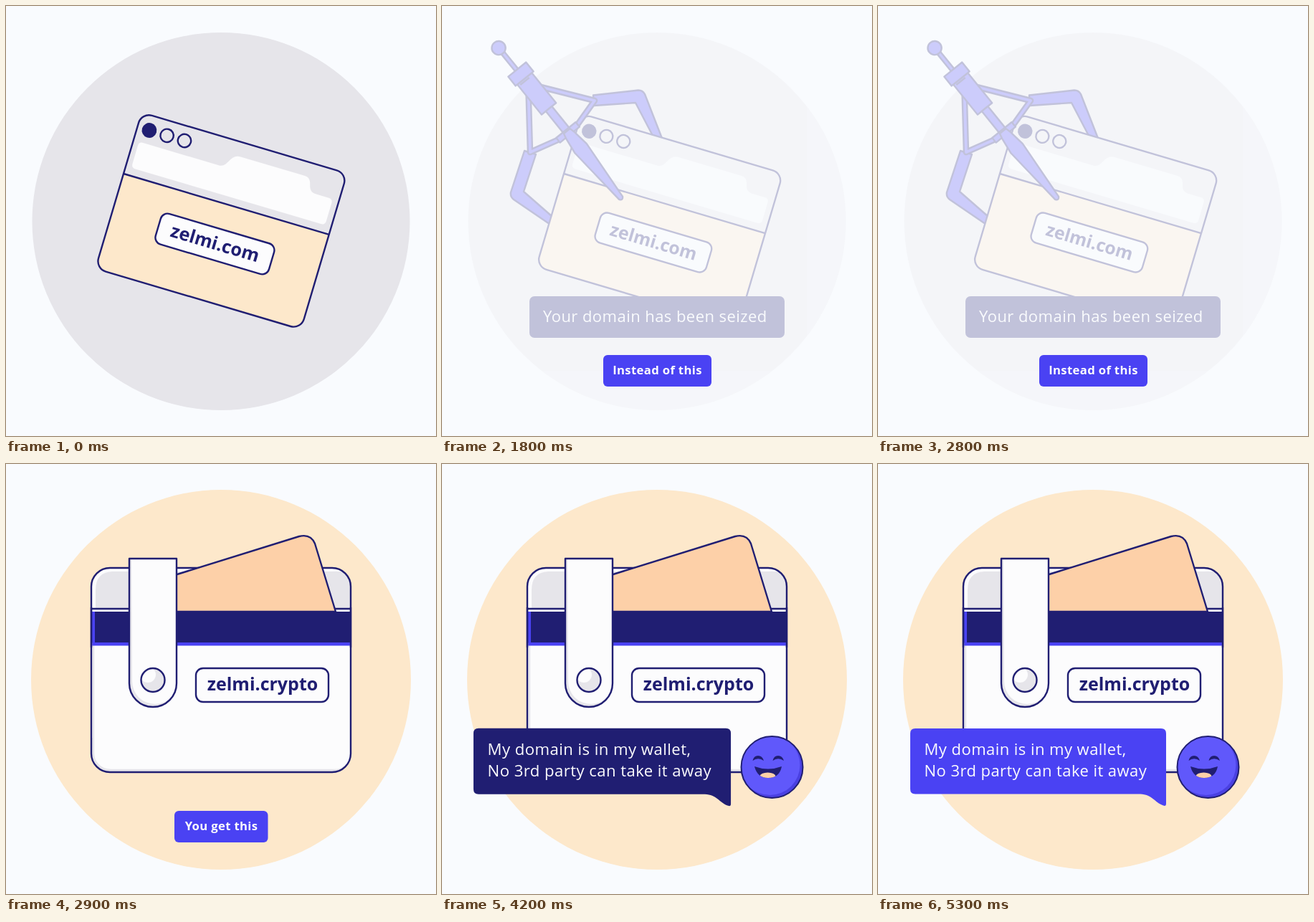
An HTML page that plays this animation: 600x600 px, repeating every 5.4 s.

```html
<!DOCTYPE html>
<html lang="en">
<head>
<meta charset="utf-8">
<title>Domain story</title>
<style>
  html, body { margin: 0; width: 100%; height: 100%; overflow: hidden; background: #f9fbfe; }
  svg {
    --navy: #201e72; --blue: #4a42f3; --page: #fcfcfd; --peach: #fde8cb; --shade: #e6e5ea; --card: #fdd0a8;
    display: block; width: 100vw; height: 100vh;
    font-family: "Open Sans", "Noto Sans", sans-serif;
  }
  text { text-anchor: middle; }
  .page { fill: var(--page); }
  .navy { fill: var(--navy); }
  .blue { fill: var(--blue); }
  .peach { fill: var(--peach); }
  .shade { fill: var(--shade); }
  .card { fill: var(--card); }
  .none { fill: none; }
  .line { stroke: var(--navy); stroke-width: 2.4; stroke-linejoin: round; }
  .bold { font-weight: 700; }
  .note { font-size: 22px; letter-spacing: .44px; }
  .tag { font-size: 16.7px; font-weight: 700; letter-spacing: .33px; }
  .left { text-anchor: start; }
  .rod { fill: none; stroke: var(--navy); stroke-width: 8.6; stroke-linejoin: round; }
  .core { fill: none; stroke: var(--blue); stroke-width: 3.8; stroke-linejoin: round; }
</style>
</head>
<body>
<svg viewBox="0 0 600 600">
  <defs>
    <clipPath id="walletClip"><rect x="119" y="145" width="362" height="285" rx="26"/></clipPath>
    <clipPath id="strapClip"><path d="M172 132H238V306A33 33 0 0 1 172 306Z"/></clipPath>
    <clipPath id="mouthClip"><path d="M436 422Q455 429 474 422Q471 438 455 438Q440 438 436 422Z"/></clipPath>
    <clipPath id="faceClip"><circle cx="460.5" cy="423" r="43"/></clipPath>
    <clipPath id="knobClip"><circle cx="205" cy="301.5" r="16.5"/></clipPath>
  </defs>

  <g id="seized">
    <circle class="shade" cx="300" cy="300.5" r="263.5"/>
    <g id="arms" class="blue line">
      <path d="M211 124.500L274 117.500Q280 117.500 283 123L313 200L304 200L270 135L212 139Z"/>
      <path d="M115 202L96 260Q95 266 100 270L160 311L162 301L114 259L131 207Z"/>
    </g>
    <g id="site">
      <rect class="peach" y="-89" width="299" height="227" rx="15"/>
      <path class="shade" d="M0 0V-74Q0 -89 15 -89H284Q299 -89 299 -74V0Z"/>
      <path class="page" d="M14 -49H124C138 -49 134 -69 150 -69H242C260 -69 248 -49 266 -49H284Q290 -49 290 -43V-17Q290 -11 284 -11H14Q8 -11 8 -17V-43Q8 -49 14 -49Z"/>
      <rect class="none line" y="-89" width="299" height="227" rx="15"/>
      <path class="line" d="M0 0H299"/>
      <circle class="navy line" cx="17.3" cy="-68.2" r="9.2"/>
      <circle class="none line" cx="43" cy="-68.2" r="9.2"/>
      <circle class="none line" cx="68.4" cy="-68.2" r="9.2"/>
      <rect class="page line" x="67.5" y="35.5" width="165" height="44.5" rx="10"/>
      <text class="navy bold" x="150" y="65.5" font-size="25.2">zelmi.com</text>
    </g>
    <g id="claw">
      <path class="rod" d="M130 111L213 132L188 167M120.500 118L123 204L168 184"/>
      <path class="core" d="M130 111L213 132L188 167M120.500 118L123 204L168 184"/>
      <g class="blue line" transform="translate(80 57.8) rotate(51.1)">
        <rect x="8" y="-1.8" width="33" height="5.6"/>
        <circle cy="1.2" r="9.6"/>
        <rect x="56" y="-13" width="54" height="26"/>
        <rect x="39.5" y="-16" width="16.5" height="32"/>
        <path class="none" d="M59 -6V10"/>
        <rect x="110" y="-5.5" width="40" height="11"/>
        <rect x="148" y="-17.500" width="8.500" height="35"/>
        <path d="M150 -5.500L158 -7.500L181 -10.500L270 -3.200Q275 0 270 3.200L181 10.500L158 7.500L150 5.500Z"/>
      </g>
    </g>
    <g id="banner">
      <rect class="navy" x="122" y="405" width="356" height="58" rx="7"/>
      <text class="page note left" x="141" y="440.500">Your domain has been seized</text>
    </g>
  </g>

  <g id="tagA">
    <rect class="blue" x="225" y="487" width="151" height="44" rx="6"/>
    <text class="page tag" x="300.500" y="514">Instead of this</text>
  </g>

  <g id="wallet">
    <circle class="peach" cx="300" cy="301" r="265"/>
    <g clip-path="url(#walletClip)">
      <rect class="shade" x="119" y="145" width="362" height="285"/>
      <path class="page" d="M119 145H481V150H148Q125 151 125 176V202H119Z"/>
      <rect class="page" x="122.500" y="202" width="360" height="224" rx="24"/>
      <rect class="page" x="119" y="202" width="362" height="180"/>
      <path class="none" stroke="#e6e5ea" stroke-width="2.500" d="M122 253V403Q122 427 146 427H460"/>
      <path class="line" d="M119 202H481"/>
    </g>
    <rect class="none line" x="119" y="145" width="362" height="285" rx="26"/>
    <path class="card line" d="M205 164.500L409 101Q425 97 431 111L460 206H205Z"/>
    <rect class="navy" x="120" y="206" width="361" height="43.500"/>
    <path class="blue" d="M120.200 206H124V249H480V253.500H120.200Z"/>
    <path class="line" d="M119 200V256M481 200V256"/>
    <g clip-path="url(#strapClip)">
      <rect class="shade" x="172" y="132" width="66" height="208"/>
      <path class="page" d="M175 132H240V303A32 32 0 0 1 176 303Z"/>
    </g>
    <path class="none line" d="M172 132H238V306A33 33 0 0 1 172 306Z"/>
    <circle class="shade" cx="205" cy="301.500" r="16.500"/>
    <circle class="page" cx="198" cy="294" r="11" clip-path="url(#knobClip)"/>
    <circle class="none line" cx="205" cy="301.500" r="16.500"/>
    <rect class="page line" x="265" y="285" width="185" height="47" rx="10"/>
    <text class="navy bold" x="358" y="315.500" font-size="25">zelmi.crypto</text>
  </g>

  <g id="tagB">
    <rect class="blue" x="235" y="484" width="130.500" height="44" rx="6"/>
    <text class="page tag" x="300.500" y="510.500">You get this</text>
  </g>

  <g id="bubble">
    <path id="balloon" d="M52 369H395Q402 369 402 376V474Q402 478 398 476.500C386 472 382 461 366 460.500H52Q45 460.500 45 453.500V376Q45 369 52 369Z"/>
    <text class="page note left" x="64.500" y="406">My domain is in my wallet,</text>
    <text class="page note left" x="64.500" y="435.500">No 3rd party can take it away</text>
  </g>

  <g id="face">
    <circle cx="460.500" cy="423" r="43" fill="#4a40e2"/>
    <circle cx="457.500" cy="420" r="42" fill="#6058fb" clip-path="url(#faceClip)"/>
    <circle class="none line" cx="460.500" cy="423" r="43" style="stroke-width:2"/>
    <path class="navy" d="M433.500 414Q435 407 441 407Q447 407 449 414Q441 408.500 433.500 414ZM461.500 414Q463 407 469 407Q475 407 477 414Q469 408.500 461.500 414Z"/>
    <path class="navy" d="M436 422Q455 429 474 422Q471 438 455 438Q440 438 436 422Z"/>
    <ellipse class="card" cx="454.500" cy="436" rx="11" ry="5.500" clip-path="url(#mouthClip)"/>
  </g>
</svg>
<script>
  const LOOP = 5400, STEP = 100;
  const GRAB = 800, FADE = 1400, WALLET = 2900, CHAT = 3800, GLOW = 4300;
  const NAVY = [32, 30, 114], BLUE = [74, 66, 243];
  const $ = id => document.getElementById(id);

  const lerp = (a, b, k) => a + (b - a) * k;
  const ramp = (t, from, ms) => Math.min(1, Math.max(0, (t - from) / ms));
  const easeOut = k => 1 - (1 - k) ** 2;
  const show = (id, on) => { $(id).style.display = on ? "" : "none"; };

  function zoom(id, s, x, y) {
    $(id).setAttribute("transform", `translate(${x} ${y}) scale(${s}) translate(${-x} ${-y})`);
  }

  function draw(t) {
    const grabbed = t >= GRAB, first = t < WALLET;
    show("seized", first);
    show("tagA", first && t > FADE);
    show("wallet", !first);
    show("tagB", !first && t <= CHAT);
    for (const id of ["arms", "claw", "banner"]) show(id, grabbed);
    for (const id of ["bubble", "face"]) show(id, t > CHAT);

    // The grip pulls the window slightly inwards.
    $("site").setAttribute("transform",
      `translate(${grabbed ? 170 : 164} 234) rotate(16.5) scale(${grabbed ? .98 : 1})`);

    const fade = ramp(t, FADE, 400);
    $("seized").style.opacity = lerp(1, .25, fade);
    $("tagA").style.opacity = fade;

    const pop = easeOut(ramp(t, CHAT, 300));
    const glow = ramp(t, GLOW, 500);
    for (const id of ["bubble", "face"]) $(id).style.opacity = pop;
    zoom("bubble", lerp(.9, 1.006, pop) - .006 * glow, 223.5, 423);
    zoom("face", lerp(.9, 1, pop), 460.5, 423);
    $("balloon").style.fill = `rgb(${NAVY.map((v, i) => Math.round(lerp(v, BLUE[i], glow))).join()})`;
  }

  const start = performance.now();
  function tick() {
    const t = (performance.now() - start) % LOOP;
    draw(Math.floor(t / STEP) * STEP);
    requestAnimationFrame(tick);
  }
  tick();
</script>
</body>
</html>
```
